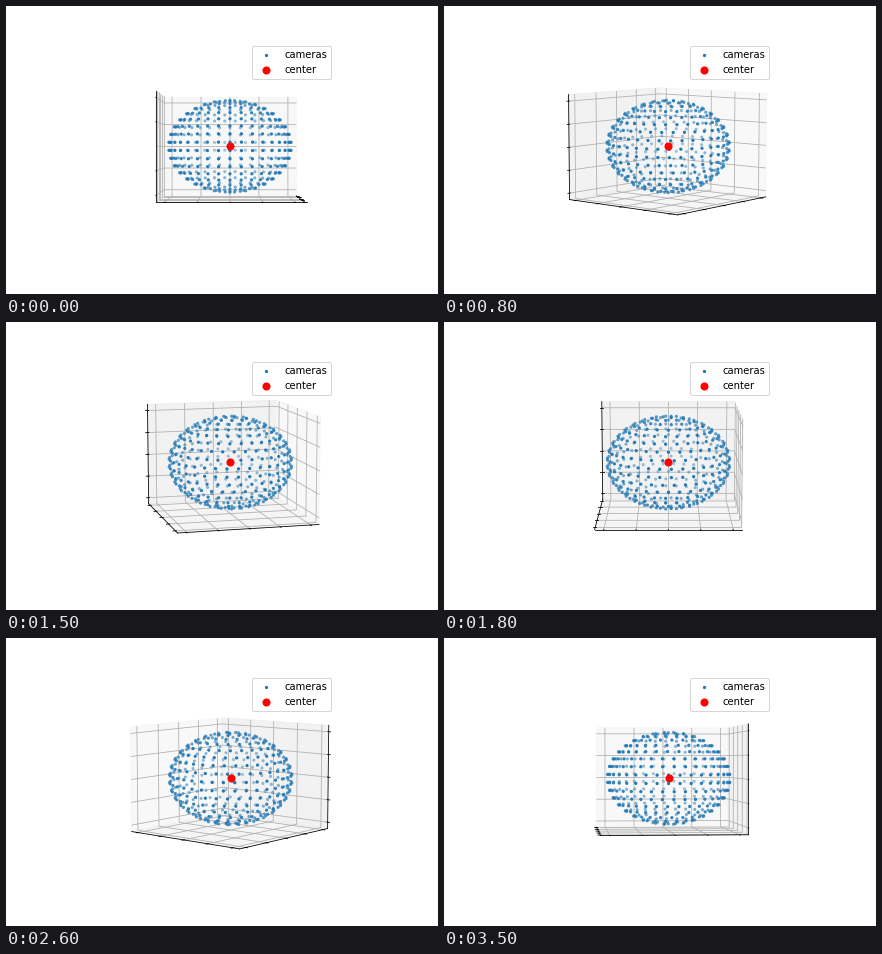
A matplotlib script that plays this animation: 432 px wide and 288 px high, repeating every 3600 ms.

```python
import numpy as np
import matplotlib.pyplot as plt
from matplotlib.animation import FuncAnimation

FRAMES = 36
INTERVAL = 100
MARGIN = 1.1 * 25 / 24  # axis range relative to the data range

# The tiny offset keeps the wall choice stable in the face-on views.
AZIM = np.linspace(1e-6, 180 - 4e-6, FRAMES, endpoint=False)
ELEV = 10 * np.sin(np.radians(AZIM))


def sphere(count=400):
    """Evenly spread points: rings with a share of points by their length."""
    area = 4 * np.pi / count
    rings = round(np.pi / np.sqrt(area))
    d_phi = area * rings / np.pi
    points = []
    for theta in np.pi * (np.arange(rings) + 0.5) / rings:
        n = round(2 * np.pi * np.sin(theta) / d_phi)
        for phi in 2 * np.pi * np.arange(n) / n:
            points.append((np.sin(theta) * np.cos(phi),
                           np.sin(theta) * np.sin(phi),
                           np.cos(theta)))
    return np.array(points).T


fig = plt.figure(figsize=(6, 4), dpi=72, facecolor="white")
fig.subplots_adjust(left=0.125, right=0.9, bottom=0.125, top=0.88)
ax = fig.add_subplot(projection="3d", computed_zorder=False)

cameras = sphere()
ax.scatter(*cameras, s=5, color="tab:blue", label="cameras", zorder=1)
ax.scatter([0], [0], [0], s=50, color="red", label="center", zorder=2)

for name, values, shift in zip("xyz", cameras, (0, 0.006, 0)):
    low, high = values.min(), values.max()
    mid, half = (low + high) / 2 + shift, (high - low) / 2 * MARGIN
    ax.set(**{f"{name}lim": (mid - half, mid + half)})
    ax.set(**{f"{name}ticks": np.linspace(-1, 1, 5)})
    ax.set(**{f"{name}ticklabels": []})

ax.legend(loc="upper right")


def update(i):
    ax.view_init(elev=ELEV[i], azim=AZIM[i])
    return []


anim = FuncAnimation(fig, update, frames=FRAMES, interval=INTERVAL,
                     init_func=lambda: update(0), repeat=True, repeat_delay=0)

plt.show()
```
